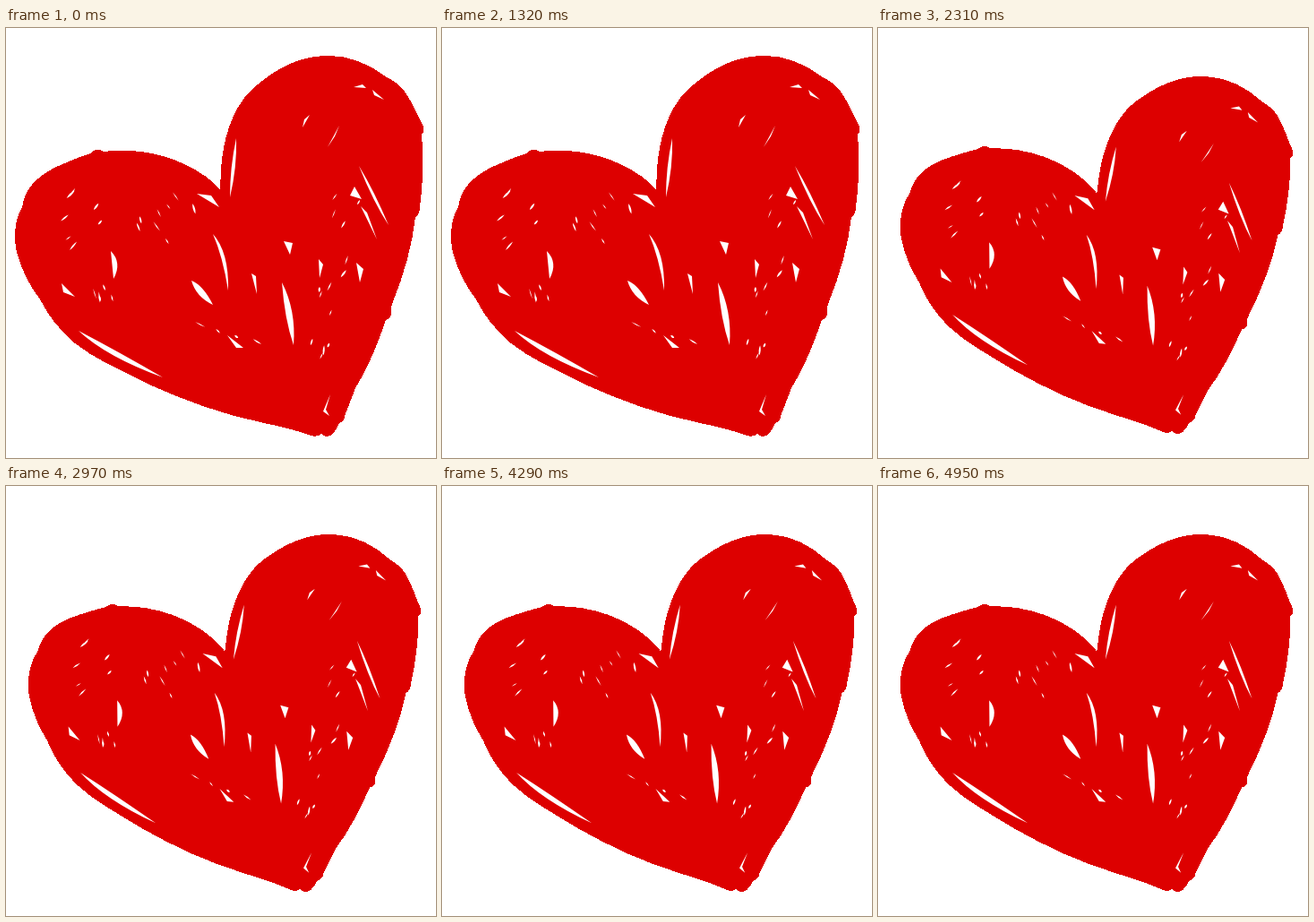
An HTML page that plays this animation: 480x480 px, repeating every 5.28 s.

```html
<!DOCTYPE html>
<html lang="en">
<head>
<meta charset="utf-8">
<title>Heart</title>
<style>
  html, body { margin: 0; width: 100%; height: 100%; overflow: hidden; background: #fff; }
  svg { display: block; width: 100%; height: 100%; }
</style>
</head>
<body>
<svg viewBox="0 0 480 480">
  <g id="heart">
    <path fill="#d00" shape-rendering="crispEdges" d="M239 180 C222 161 186 140 141 137 Q124 136 109 138
      Q101 133 94 140 Q76 146 54 156 C33 167 21 180 18 200 C9 214 8 238 13 254 Q21 281 38 303
      Q52 331 77 352 C98 369 128 382 160 398 C200 416 240 431 288 441 Q318 447 341 455
      Q348 457 352 453 Q358 459 365 453 Q369 448 372 441 Q378 439 378 433 Q384 418 390 402
      C404 380 416 350 424 326 Q431 324 430 317 Q429 313 431 308 C444 277 454 240 457 211
      Q462 208 462 200 C465 175 467 150 464 119 Q469 114 464 106 C459 97 453 82 445 71
      Q438 61 425 55 C405 40 382 30 358 31 C325 31 297 48 273 70 C252 91 242 125 240 158Z"/>
    <!-- the larger gaps left between pen strokes -->
    <path fill="#fff" d="M257 123 Q250 155 250 189 Q258 155 257 123Z
      M388 66 L398 63 L402 67Z M409 69 L422 80 L411 75Z M331 111 L333 102 L339 97Z M359 133 L372 109 L367 121Z
      M394 154 Q411 182 427 220 Q410 194 394 154Z M396 199 L403 206 L414 236Z M389 177 L397 191 L384 187Z
      M213 185 L229 187 L238 200Z M117 249 Q130 262 120 280Z M62 285 L77 300 L64 295Z
      M231 230 Q249 250 248 293 Q242 255 231 230Z M207 282 Q220 287 231 309 Q212 300 207 282Z
      M247 343 L265 357 L257 357Z M81 338 Q125 361 175 390 Q112 367 81 338Z
      M310 238 L320 240 L317 253Z M391 262 L399 269 L395 284Z M349 258 L354 264 L350 279Z
      M308 284 Q324 315 321 354 Q311 325 308 284Z M274 274 L279 277 L280 297Z
      M362 409 L357 426 L361 433 L354 428Z"/>
    <path id="specks" fill="#fff"/>
  </g>
</svg>
<script>
const STEP = 330;
const heart = document.getElementById("heart");

let seed = 7;
function random() {
  seed = (seed * 16807) % 2147483647;
  return seed / 2147483647;
}

// Spread around a centre: -size to size
const spread = size => (random() * 2 - 1) * size;

// A thin gap, pointed at both ends
function sliver(x, y, angle, length, width) {
  const dx = Math.cos(angle) * length / 2, dy = Math.sin(angle) * length / 2;
  const nx = -Math.sin(angle) * width, ny = Math.cos(angle) * width;
  return `M${x - dx} ${y - dy}Q${x + nx} ${y + ny} ${x + dx} ${y + dy}Q${x - nx} ${y - ny} ${x - dx} ${y - dy}Z`;
}

// Small gaps inside an ellipse, all leaning roughly the same way
function hatch(count, cx, cy, rx, ry, degrees) {
  let path = "";
  for (let i = 0; i < count; i++) {
    const turn = random() * 2 * Math.PI, r = Math.sqrt(random());
    const angle = (degrees + spread(12)) * Math.PI / 180;
    path += sliver(cx + rx * r * Math.cos(turn), cy + ry * r * Math.sin(turn),
      angle, 9 + spread(4), 1.7 + spread(0.8));
  }
  return path;
}

document.getElementById("specks").setAttribute("d",
  hatch(8, 80, 217, 26, 42, -45) +
  hatch(5, 112, 297, 20, 8, 80) +
  hatch(8, 180, 215, 36, 30, 65) +
  hatch(4, 245, 350, 45, 26, 38) +
  hatch(8, 352, 325, 14, 48, -75) +
  hatch(6, 385, 210, 22, 70, -65));

// The heart snaps between its full size and a smaller, tilted pose.
const poses = ["", "translate(34.6 -3.9) rotate(4.95) scale(.942)"];

function draw(time) {
  heart.setAttribute("transform", poses[Math.floor(time / STEP) % 2]);
}

const start = performance.now();
function tick() {
  draw(performance.now() - start);
  requestAnimationFrame(tick);
}
tick();
</script>
</body>
</html>
```
